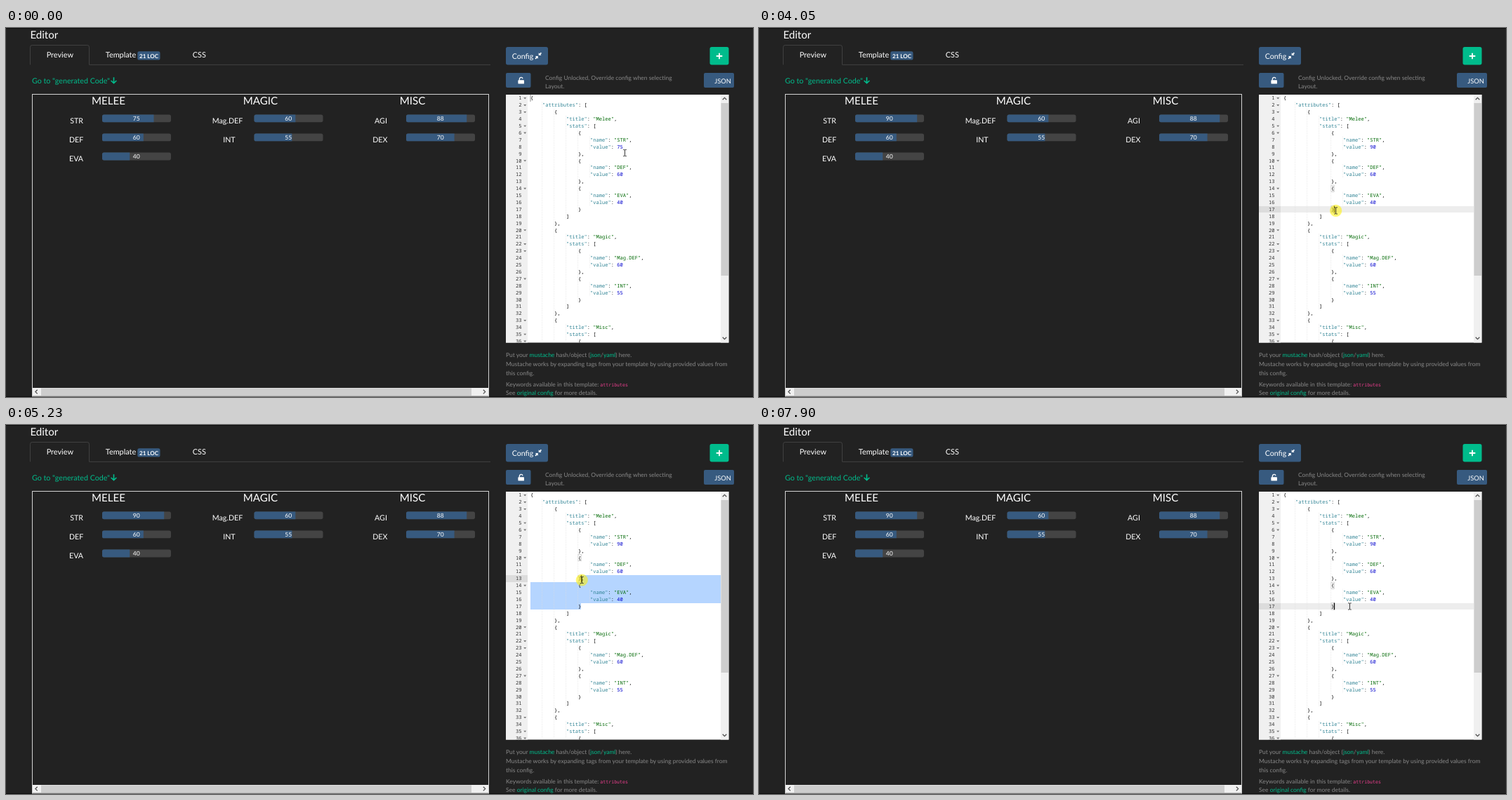
Recreate the animation shown at these times as an HTML page. Size 1064 px wide and 526 px high, loop 8 s.

```html
<!DOCTYPE html>
<html lang="en">
<head>
<meta charset="utf-8">
<title>Editor</title>
<style>
html, body { margin: 0; width: 100%; height: 100%; overflow: hidden; background: #222 }
svg { display: block; text-rendering: geometricPrecision }
text { font-family: Lato, sans-serif; font-size: 10.67px; fill: #fff }
.mid { text-anchor: middle }
.tab { font-size: 10.9px }
.head { font-size: 15.1px }
.num { font-size: 8.53px; text-anchor: middle }
.note { font-size: 8.46px; fill: #888 }
.link { fill: #00bc8c }
.code text { font: 500 7.08px "Noto Sans Mono", "DejaVu Sans Mono", monospace; fill: #000 }
.code .key { fill: #318495 }
.code .str { fill: #036a07 }
.code .int { fill: #0000cd }
.code .no { fill: #333; text-anchor: end }
.icon { fill: none; stroke: #505050; stroke-width: 1.3 }
</style>
</head>
<body>
<svg width="100%" height="100%" viewBox="0 0 1064 526">
  <rect width="1064" height="526" fill="#222"/>
  <path d="M0 .5H1064M0 525.6H1064" stroke="#0c0c0c"/>

  <text class="head" x="34.4" y="15">Editor</text>
  <path d="M118.5 52.4H690M34.5 52.4V27.2q0-2.7 2.7-2.7H115.8q2.7 0 2.7 2.7V52.4" fill="none" stroke="#444" stroke-width=".9"/>
  <text class="tab mid" x="76.8" y="42.3">Preview</text>
  <text class="tab" x="141.8" y="42.3">Template</text>
  <rect x="187.3" y="33.3" width="32.2" height="12.2" rx="2.6" fill="#375a7f"/>
  <text class="mid" x="203.5" y="42.5" style="font-size:8px;font-weight:700">21 LOC</text>
  <text class="tab mid" x="275.3" y="42.3">CSS</text>
  <text class="link" x="37" y="78.6">Go to "generated Code"</text>
  <path d="M153.5 70.3V78.4M149.6 75l3.9 3.7 3.9-3.7" fill="none" stroke="#00bc8c" stroke-width="1.6"/>

  <rect x="37.5" y="94.5" width="650" height="430.5" fill="none" stroke="#fff" stroke-opacity=".8"/>
  <g id="stats"></g>
  <rect x="38" y="513" width="649" height="11.5" fill="#f0f0f0"/>
  <rect x="50" y="513.5" width="613" height="10.5" fill="#cdcdcd"/>
  <path class="icon" d="M44.7 515.8l-2.8 2.8 2.8 2.8M679.8 515.8l2.8 2.8-2.8 2.8"/>

  <rect x="712" y="27" width="60" height="25.5" rx="2.7" fill="#375a7f"/>
  <text x="720.7" y="44.1">Config</text>
  <path d="M758.7 35.3V39.1H762.5ZM757.7 40.1V43.9L753.9 40.1Z" fill="#fff"/>
  <path d="M762.4 35.4l-3 3M754 43.8l3-3" stroke="#fff" stroke-width="1.7"/>
  <rect x="1002.5" y="27" width="27" height="25.5" rx="2.7" fill="#00bc8c"/>
  <path d="M1016 35.7V44.3M1011.7 40H1020.3" stroke="#fff" stroke-width="1.8"/>
  <rect x="712" y="64" width="35.5" height="21" rx="2" fill="#375a7f"/>
  <rect x="729.4" y="74.3" width="8.6" height="5.3" rx=".9" fill="#fff"/>
  <path d="M731.3 74.5V72.8a2.4 2.4 0 0 1 4.7-.6" fill="none" stroke="#fff" stroke-width="1.3"/>
  <text class="note" x="768" y="73.6">Config Unlocked, Override config when selecting</text>
  <text class="note" x="768" y="86.4">Layout.</text>
  <rect x="994" y="64" width="43" height="21" rx="2" fill="#375a7f"/>
  <text class="mid" x="1021.1" y="78.9" style="font-size:9.33px">JSON</text>

  <svg class="code" x="712" y="95" width="317.4" height="353.4" viewBox="712 95 317.4 353.4">
    <rect x="712" y="95" width="318" height="354" fill="#fff"/>
    <rect x="712" y="95" width="31" height="354" fill="#f0f0f0"/>
    <g id="marks" shape-rendering="crispEdges"></g>
    <g id="lines"></g>
    <g id="caret"></g>
    <rect x="1018" y="95" width="12" height="354" fill="#f0f0f0"/>
    <rect x="1018.5" y="107" width="10.5" height="246" fill="#cdcdcd"/>
    <path class="icon" d="M1020.7 102.2l2.8-2.8 2.8 2.8M1020.7 440.8l2.8 2.8 2.8-2.8"/>
  </svg>

  <text class="note" x="712" y="469.3">Put your <tspan class="link">mustache</tspan> hash/object (<tspan class="link">json</tspan>/<tspan class="link">yaml</tspan>) here.</text>
  <text class="note" x="712" y="482.1">Mustache works by expanding tags from your template by using provided values from</text>
  <text class="note" x="712" y="494.9">this config.</text>
  <text class="note" x="712" y="510.6">Keywords available in this template:</text>
  <text x="846.3" y="510.6" style="font:6.6px 'DejaVu Sans Mono',monospace;fill:#e83e8c">attributes</text>
  <text class="note" x="712" y="523.2">See <tspan class="link">original config</tspan> for more details.</text>

  <circle id="click" r="8.6" fill="#fff000" fill-opacity=".55"/>
  <path id="beam" d="M-2.3-4.6H-.7L0-4.1.7-4.6H2.3M0-4.1V4.1M-2.3 4.6H-.7L0 4.1.7 4.6H2.3" fill="none" stroke="#111" stroke-width=".85"/>
  <path id="arrow" d="M0 0V9L2.1 7.1 3.5 10.2 4.9 9.6 3.5 6.6H6.2Z" fill="#fff" stroke="#111" stroke-width=".7"/>
</svg>
<script>
const $ = id => document.getElementById(id);
const X0 = 747, Y0 = 95.1, CH = 4.25, LH = 9.9, LOOP = 8000;
const colX = c => X0 + c * CH;
const rowY = r => Y0 + (r - 1) * LH;
const rect = (x, y, w, h, attrs) => `<rect x="${x}" y="${y}" width="${w}" height="${h}" ${attrs}/>`;
const text = (x, y, s, cls = '') => `<text x="${x}" y="${y}" class="${cls}">${s}</text>`;

const stat = (name, value) => ({ name, value });
const config = { attributes: [
  { title: 'Melee', stats: [stat('STR', 75), stat('DEF', 60), stat('EVA', 40)] },
  { title: 'Magic', stats: [stat('Mag.DEF', 60), stat('INT', 55)] },
  { title: 'Misc', stats: [stat('AGI', 88), stat('DEX', 70)] }
] };
const labelX = [[100.6, 100.1, 100.1], [315.5, 317.9], [534, 532.8]];

let lines;

function drawStats() {
  $('stats').innerHTML = config.attributes.map((group, i) => {
    const x = 137 + 216.5 * i;
    return text(146 + 216.5 * i, 108.5, group.title.toUpperCase(), 'head mid') +
      group.stats.map(({ name, value }, j) => {
        const y = 123.4 + 27.1 * j;
        return text(labelX[i][j], y + 12.4, name, 'mid') +
          rect(x, y, 98, 10.8, 'rx="2.6" fill="#444"') +
          `<path d="M${x + .98 * value} ${y}H${x + 2.6}q-2.6 0-2.6 2.6v5.6q0 2.6 2.6 2.6H${x + .98 * value}Z" fill="#375a7f"/>` +
          text(x + 48.7, y + 8.6, value, 'num');
      }).join('');
  }).join('');
}

function drawLine(s, i) {
  const y = rowY(i + 1), base = y + 7.3;
  let out = text(734.6, base, i + 1, 'no');
  if (/[{[]$/.test(s)) out += `<path d="M737.2 ${y + 4}h4l-2 2.4Z" fill="#777"/>`;
  for (let c = 4; c <= s.search(/\S/); c += 4)
    out += `<path d="M${colX(c) - .4} ${y}v${LH}" stroke="#ddd" stroke-width=".6" stroke-dasharray=".7 .7"/>`;
  for (const m of s.matchAll(/"[^"]*"|\d+|[^"\d\s]+/g)) {
    const quoted = m[0][0] === '"';
    const cls = quoted ? (s[m.index + m[0].length] === ':' ? 'key' : 'str') : /\d/.test(m[0]) ? 'int' : '';
    out += text(colX(m.index), base, m[0], cls);
  }
  return out;
}

function setStrength(value) {
  const str = config.attributes[0].stats[0];
  if (lines && str.value === value) return;
  str.value = value;
  lines = JSON.stringify(config, null, 4).split('\n').slice(0, 36);
  $('lines').innerHTML = lines.map(drawLine).join('');
  drawStats();
}

// time, x, y
const path = [
  [0, 881.5, 178], [350, 881.5, 178], [620, 876.9, 174], [2650, 876.9, 174],
  [3050, 866, 194], [3450, 847, 247], [3750, 822, 263], [3950, 821, 263],
  [4260, 823, 255], [4360, 823.5, 248.2], [4710, 822, 224], [5010, 822, 224],
  [5230, 820.3, 221], [6400, 820.3, 221], [6600, 832, 236], [6800, 843.5, 253],
  [7200, 841.4, 258.5], [LOOP, 841.4, 258.5]
];

function pointerAt(t) {
  const i = Math.max(1, path.findIndex(p => p[0] >= t));
  const [a, b] = [path[i - 1], path[i]];
  const k = (t - a[0]) / (b[0] - a[0]);
  return [a[1] + (b[1] - a[1]) * k, a[2] + (b[2] - a[2]) * k];
}

// Text position under the pointer
function hit(t) {
  const [x, y] = pointerAt(t);
  const row = Math.floor((y - Y0) / LH) + 1;
  return [row, Math.min(lines[row - 1].length, Math.round((x - X0) / CH))];
}

function selection([r1, c1], [r2, c2]) {
  let out = '';
  for (let r = r1; r <= r2; r++) {
    const x = colX(r === r1 ? c1 : 0);
    out += rect(x, rowY(r), (r === r2 ? colX(c2) : 1018) - x, LH, 'fill="#b5d5ff"');
  }
  return out;
}

const PRESS = 3800, CLEAR = 7350;
const resets = [770, 1070, 2040, 2500, PRESS, 4300, 4700, 5220, 7400];

function draw(t) {
  setStrength(t < 2040 ? 75 : t < 2500 ? 9 : 90);
  const [px, py] = pointerAt(t);
  const active = t >= 770, dragged = t >= PRESS && t < CLEAR;
  const caret = !active ? [1, 0] : hit(t < PRESS ? 770 : dragged ? Math.min(t, 5600) : CLEAR);
  const [row, col] = caret;

  let marks = '';
  if (active) {
    marks += rect(712, rowY(row), 31, LH, 'fill="#dcdcdc"');
    if (!dragged || row === 17) marks += rect(743, rowY(row), 275, LH, 'fill="#ededed"');
  }
  if (t >= 920 && t < 2040) marks += selection([8, 29], [8, 31]);
  if (dragged && row < 17) marks += selection(caret, [17, 17]);
  if (t >= PRESS + 50) {
    const pair = t >= 5100 && t < CLEAR ? [10, 13] : [14, 17];
    for (const r of pair)
      marks += rect(colX(16), rowY(r) + .3, CH, LH - .6, 'fill="none" stroke="#c0c0c0" stroke-width=".7" shape-rendering="auto"');
  }
  $('marks').innerHTML = marks;

  const since = t - (resets.filter(r => r <= t).pop() ?? t);
  $('caret').innerHTML = since % 980 < 600
    ? rect(colX(col) - .4, rowY(row), active ? 1.3 : .8, LH, `fill="${active ? '#000' : '#777'}"`) : '';

  const pressed = [[770, 1080], [PRESS, 5570], [CLEAR, 7650]].find(([a, b]) => t >= a && t < b);
  const inside = t > 6400 && t < 6800;
  const place = (id, shown) => {
    $(id).setAttribute('transform', `translate(${px} ${py})`);
    $(id).setAttribute('visibility', shown ? 'visible' : 'hidden');
  };
  place('click', pressed);
  place('beam', !inside && !(t >= 2200 && t < 2650));
  place('arrow', inside);
}

const start = performance.now();
function tick() {
  draw((performance.now() - start) % LOOP);
  requestAnimationFrame(tick);
}
tick();
</script>
</body>
</html>
```
